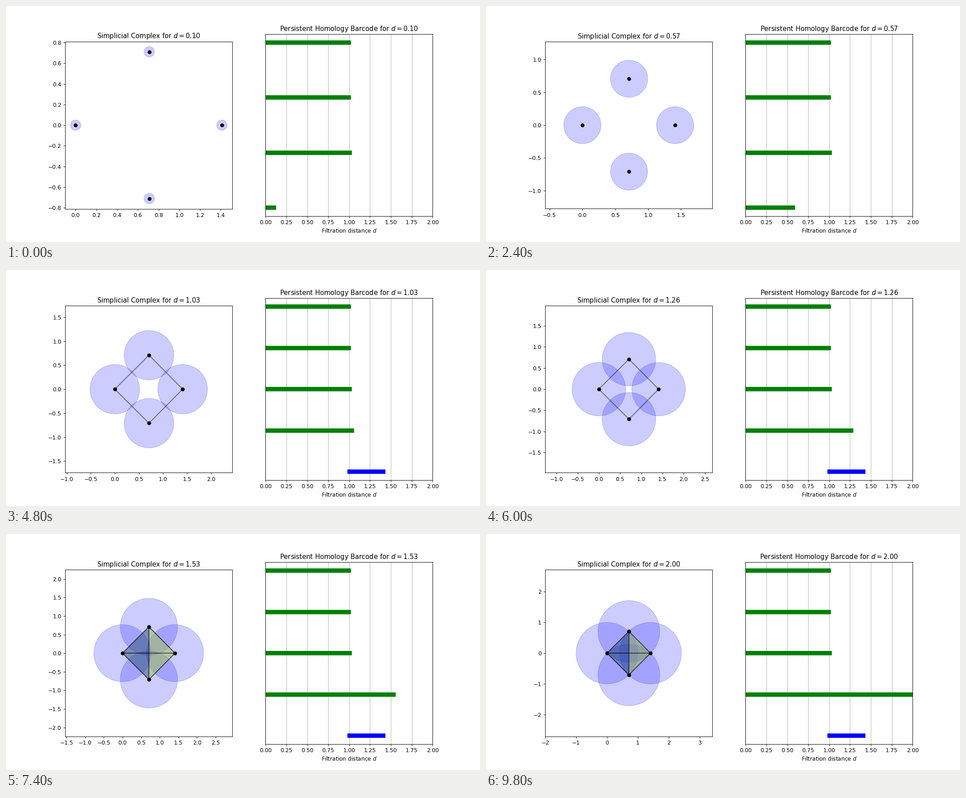
A matplotlib script that plays this animation: 1058 by 529 pixels, repeating every 10000 ms.

```python
from itertools import combinations

import numpy as np
import matplotlib.pyplot as plt
from matplotlib.animation import FuncAnimation

FRAMES = 50
INTERVAL = 200
WIDTH_PX = 1058
POINTS = np.array([(0, 0), (0.71, 0.71), (0.71, -0.71), (1.41, 0)])
X, Y = POINTS.T


def length(pair):
    i, j = pair
    return np.hypot(*(POINTS[i] - POINTS[j]))


def diameter(simplex):
    return max(length(pair) for pair in combinations(simplex, 2))


def simplices(size, d):
    return [s for s in combinations(range(len(POINTS)), size)
            if diameter(s) <= d]


SIDE_SHORT = length((1, 3))
SIDE_LONG = length((0, 1))
DIAGONAL = length((0, 3))

# the tiny surplus keeps the pixel size from rounding down
fig, (left, right) = plt.subplots(1, 2, figsize=(12, 6),
                                  dpi=(WIDTH_PX + 1e-4) / 12)


def draw_complex(ax, d):
    ax.clear()
    ax.set_aspect("equal")
    for p in POINTS:
        ax.add_patch(plt.Circle(p, d / 2, color="blue", alpha=0.2))
    triangles = simplices(3, d)
    if triangles:
        # faces are coloured by the mean x of their corners
        ax.tripcolor(X, Y, X, triangles=triangles, alpha=0.3,
                     edgecolors="k", linewidths=1)
    for edge in simplices(2, d):
        ax.plot(*POINTS[list(edge)].T, "k-", alpha=0.5)
    ax.plot(X, Y, "ko")
    ax.set_xlim(X.min() - d, X.max() + d)
    ax.set_ylim(Y.min() - d, Y.max() + d)
    ax.set_title(f"Simplicial Complex for $d = {d:.2f}$")


def draw_barcode(ax, d):
    ax.clear()
    bars = [(0, d, "green"), (0, SIDE_LONG, "green"),
            (0, SIDE_SHORT, "green"), (0, SIDE_SHORT, "green")]
    if d >= SIDE_LONG:
        bars.insert(0, (SIDE_LONG, DIAGONAL, "blue"))
    for row, (birth, death, color) in enumerate(bars):
        ax.plot([birth, death], [row, row], color=color, lw=8)
    ax.set_xlim(0, 2)
    ax.set_yticks([])
    ax.grid(True, axis="x")
    ax.set_xlabel("Filtration distance $d$")
    ax.set_title(f"Persistent Homology Barcode for $d = {d:.2f}$")


def update(frame):
    d = 0.1 + 1.9 * frame / (FRAMES - 1)
    draw_complex(left, d)
    draw_barcode(right, d)
    return []


anim = FuncAnimation(fig, update, frames=FRAMES, interval=INTERVAL,
                     repeat=True, repeat_delay=0)
plt.show()
```
